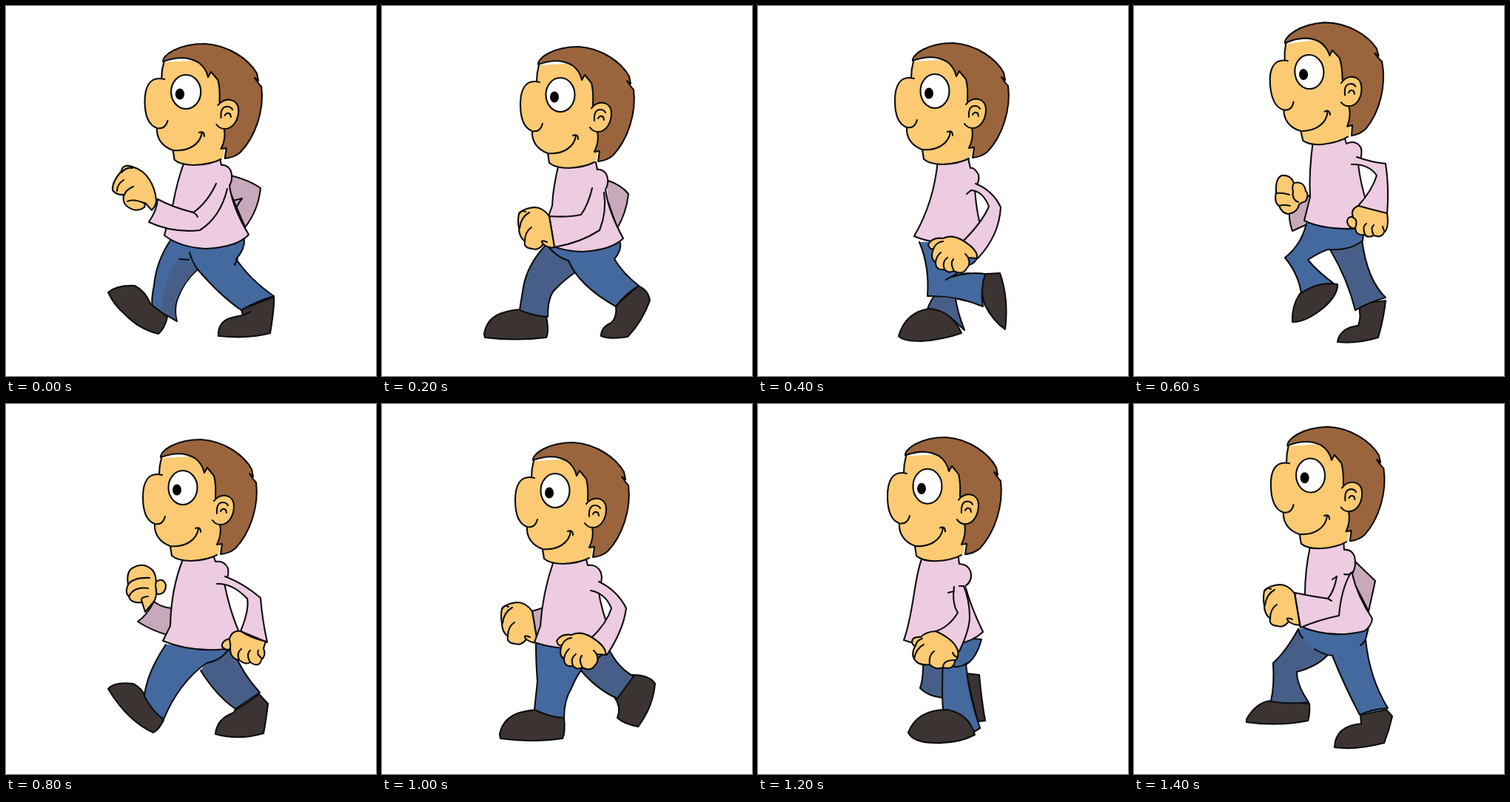
An HTML page that plays this animation: 500x500 px, repeating every 1.6 s.

```html
<!DOCTYPE html>
<html lang="en">
<head>
<meta charset="utf-8">
<title>Walk cycle</title>
<style>
html, body { margin: 0; width: 100%; height: 100%; overflow: hidden; background: #fff; }
svg { display: block; width: 100%; height: 100%; }
path, ellipse { stroke: #0c0c0e; stroke-width: 2.1; stroke-linecap: round; stroke-linejoin: round; }
.skin { fill: #fbca72; }
.hair { fill: #9a653c; }
.pink { fill: #edcbe0; }
.dull { fill: #c8a9bb; }
.blue { fill: #43699f; }
.navy { fill: #475f88; }
.boot { fill: #3b3432; }
.line { fill: none; }
.flat { stroke: none; }
.pose { opacity: 0; animation: show 1.6s step-end infinite; animation-delay: calc(var(--i) * 200ms - 1600ms); }
@keyframes show {
  0% { opacity: 1; }
  12.5%, 100% { opacity: 0; }
}
</style>
</head>
<body>
<svg viewBox="0 0 500 500">
<defs>
  <g id="head">
    <path class="skin flat" d="M210 73Q207 84 207 95C191 94 185 107 185 126C185 146 190 158 201 162C200 176 208 187 222 192L224 205Q232 212 250 212Q272 211 287 203L296 160L286 90L262 70Z"/>
    <path class="line" d="M210 73Q207 84 207 95M211 96C191 91 185 107 185 126C185 146 190 158 201 162Q212 164 215 152M201 162C200 176 208 187 222 192C242 194 258 184 260 168M256 168Q263 165 263 173M222 192L224 205Q232 212 250 212Q272 211 285 204"/>
    <path class="hair" d="M209 72C208 64 228 48 264 48C296 50 322 70 332 88L334 98L329 94Q334 102 338 106C342 138 330 174 310 195Q302 202 290 203L292 189L285 190Q292 176 289 162L283 126Q284 108 281 97L272 86L268 93Q265 80 255 73Q236 62 209 72Z"/>
    <path class="skin" d="M281 131C290 119 308 122 308 138C308 152 300 163 290 163Q283 163 279 157"/>
    <path class="line" d="M285 148Q284 133 293 133Q298 133 300 137M290 145Q292 140 297 143L298 147"/>
    <ellipse cx="239" cy="113" rx="19.5" ry="23" fill="#fff"/>
    <ellipse class="flat" cx="231" cy="116" rx="6" ry="7.5" fill="#000"/>
  </g>
  <g id="low-hand">
    <path class="skin" d="M277 317Q262 308 250 314Q236 312 230 322Q232 330 237 328Q232 342 240 346Q240 358 252 356Q258 362 264 358Q276 364 281 356Q288 350 284 340L296 341Q298 330 277 317Z"/>
    <path class="line" d="M237 328Q241 319 250 318M240 346Q241 338 247 333M252 356Q248 346 256 340M265 358Q259 348 264 342M284 340Q282 337 280 335"/>
  </g>
  <g id="side-hand">
    <path class="skin" d="M217 256Q208 244 197 244Q180 246 176 253Q174 262 176 272Q176 284 184 290Q182 299 194 300Q202 303 209 294Q218 300 224 298Z"/>
    <path class="line" d="M177 272Q179 257 190 251M184 290Q184 277 193 271M209 294Q203 287 214 291M176 253Q179 247 185 250"/>
  </g>
</defs>

<g class="pose" style="--i:0">
  <path class="dull" d="M304 229Q330 236 344 246Q341 276 323 299L298 240"/>
  <path class="line" d="M307 263L319 260Q315 265 312 271"/>
  <path class="boot" d="M138 387Q150 377 174 378Q188 385 195 402L218 420Q215 435 206 443Q180 437 160 416Q146 404 138 387Z"/>
  <path class="boot" d="M318 410L362 393Q363 405 357 442Q330 450 287 446Q286 428 302 422Q312 419 320 418Z"/>
  <path class="line" d="M320 418L331 413"/>
  <path class="blue" d="M222 317Q203 345 200 378Q196 398 198 405Q214 417 231 426Q227 412 231 398Q240 372 259 356Q290 392 318 411Q338 399 362 392Q330 370 311 342Q323 328 322 316"/>
  <path class="navy flat" d="M233 342Q247 342 258 356Q240 372 230 398Q226 412 230 424L209 412Q212 370 233 342"/>
  <path class="line" d="M234 342L247 343M248 333Q252 347 259 356M309 350L313 341"/>
  <path class="pink" d="M241 210Q231 238 226 266L214 310Q235 326 270 328Q312 326 328 309Q306 272 302 243Q308 232 303 221Q298 214 291 215L289 205"/>
  <path class="pink" d="M284 240Q272 266 253 279Q225 272 205 261Q204 276 193 292Q225 307 262 303Q290 285 299 247"/>
  <path class="line" d="M250 278Q257 280 259 285"/>
  <path class="skin" d="M203 262C201 242 190 223 173 218Q158 212 156 223Q143 238 144 249Q150 256 159 255Q157 266 164 271Q176 280 187 272L188 266L197 276Q203 270 203 262Z"/>
  <path class="line" d="M156 225Q163 217 171 219M150 250Q150 241 159 235M159 257Q162 248 172 244M164 264Q173 260 188 267"/>
  <use href="#head" transform="translate(-3 3) scale(1.03 1)"/>
</g>

<g class="pose" style="--i:1">
  <path class="dull" d="M303 235Q324 242 333 254Q330 280 318 300L306 266"/>
  <path class="boot" d="M138 443Q142 420 165 414Q178 410 190 410L222 420Q226 440 222 448Q180 453 139 448Z"/>
  <path class="boot" d="M316 405L346 378Q360 384 362 398Q352 426 332 447Q310 451 296 446Q296 434 310 428Q318 420 316 405Z"/>
  <path class="navy" d="M222 322Q196 350 191 380L186 411Q205 419 224 420Q224 395 232 385Q246 370 264 358L270 325"/>
  <path class="blue" d="M222 322Q236 340 252 344Q266 378 316 406Q328 390 347 378Q326 362 314 342Q324 330 322 320"/>
  <path class="pink" d="M239 213Q231 245 230 270L214 315Q235 331 270 332Q310 330 326 314Q306 278 302 248Q308 238 303 227Q298 220 291 221L289 211"/>
  <path class="pink" d="M284 246Q279 268 269 282Q250 286 226 284L233 326Q268 320 294 303Q304 278 300 252"/>
  <use href="#side-hand" x="9" y="28"/>
  <use href="#head" transform="translate(2 7)"/>
</g>

<g class="pose" style="--i:2">
  <path class="navy" d="M238 392Q229 405 228 415L265 425L279 438Q270 415 267 396"/>
  <path class="boot" d="M190 446Q200 413 232 409Q262 412 275 442Q250 451 220 453Q195 453 190 446Z"/>
  <path class="boot" d="M307 362L327 361Q339 395 334 437Q318 426 307 405Q299 385 307 362Z"/>
  <path class="blue" d="M218 319Q232 352 229 392Q268 391 304 406Q300 384 307 362Q285 359 262 366L285 350Q294 348 297 338L285 318"/>
  <path class="line" d="M254 370Q262 363 285 361"/>
  <path class="pink" d="M243 208Q238 265 211 311Q235 322 275 320L300 295Q294 270 293 245Q300 238 298 228Q292 217 287 219L284 206"/>
  <path class="pink" d="M294 240Q318 250 328 272Q326 310 297 341L277 318Q303 292 312 271Q304 250 288 249L282 254"/>
  <use href="#low-hand"/>
  <use href="#head" transform="translate(0 2)"/>
</g>

<g class="pose" style="--i:3">
  <path class="dull" d="M237 256L210 276Q209 290 214 304L236 294"/>
  <path class="skin" d="M208 281Q200 280 196 270Q189 266 192 252Q191 232 200 229Q212 228 216 239Q230 236 232 250Q237 254 232 264Q222 266 222 272Q218 280 208 281Z"/>
  <path class="line" d="M216 239Q213 244 215 250Q213 262 222 265M192 253Q201 252 210 255M196 270Q203 268 211 270"/>
  <path class="boot" d="M303 403L340 398Q338 420 330 448Q300 457 275 454Q278 435 303 432Q308 420 303 403Z"/>
  <path class="navy" d="M265 329Q289 370 299 411Q318 400 340 394Q315 370 308 316"/>
  <path class="boot" d="M224 389Q245 372 275 376Q276 390 256 408Q231 428 214 427Q213 405 224 389Z"/>
  <path class="blue" d="M233 294Q226 323 204 340Q222 362 226 388Q245 374 270 375Q247 358 235 343Q250 333 262 329Q292 331 309 317L312 295"/>
  <path class="pink" d="M242 182Q236 225 238 258L230 290Q255 302 297 301L315 268Q306 240 303 214Q309 203 307 192Q300 180 287 186L284 176"/>
  <path class="pink" d="M301 204Q320 211 340 213Q345 245 342 282L303 270Q322 249 328 229Q317 213 294 214"/>
  <path class="skin" d="M303 270Q292 275 296 285Q288 284 288 292Q291 302 299 300Q300 311 312 309Q316 314 324 310Q334 314 338 306Q345 300 342 280Q325 276 303 270Z"/>
  <path class="line" d="M296 286Q303 288 299 300M312 308Q308 298 314 294M324 310Q319 300 324 296M338 304L336 298"/>
  <use href="#head" transform="translate(-1 -25.5) rotate(-4 260 130)"/>
</g>

<g class="pose" style="--i:4">
  <path class="dull" d="M200 267Q190 286 178 294Q196 306 221 313L224 276Q210 275 200 267Z"/>
  <path class="skin" d="M199 268L188 281L184 268Q168 270 166 260Q160 255 165 244Q162 226 172 221Q184 214 195 222Q202 226 203 240Q212 234 216 244Q216 256 207 257Q202 258 203 250Q204 262 199 268Z"/>
  <path class="line" d="M165 244Q172 234 194 235M166 260Q173 246 192 249M184 268Q180 261 192 260M203 240Q201 245 203 250"/>
  <path class="boot" d="M309 414Q330 402 342 392L354 405Q351 430 348 445Q315 455 283 446Q285 425 308 417Z"/>
  <path class="navy" d="M263 360Q284 394 310 412L343 390Q320 365 308 335L285 330"/>
  <path class="boot" d="M138 385Q146 375 172 378Q185 385 189 397L213 427Q207 440 199 444Q165 429 138 385Z"/>
  <path class="blue" d="M216 325Q190 364 187 395Q198 416 213 426Q234 376 271 350Q295 345 302 328"/>
  <path class="pink" d="M239 210Q223 250 222 300L212 320Q250 336 298 331L314 306Q302 278 295 242Q302 234 300 222Q295 211 283 213L280 204"/>
  <path class="pink" d="M296 233Q322 243 344 262Q346 290 353 322L317 307Q329 278 326 263Q306 242 285 243"/>
  <path class="skin" d="M317 307Q306 305 302 317Q291 320 292 328Q297 334 303 331Q303 344 315 346Q324 353 330 349Q342 357 345 346Q352 340 348 330L351 321Q330 316 317 307Z"/>
  <path class="line" d="M302 318Q304 325 303 331M315 346Q311 336 318 331M330 349Q324 338 330 333M346 344Q338 338 341 333"/>
  <use href="#head"/>
</g>

<g class="pose" style="--i:5">
  <path class="dull" d="M222 274L203 280L210 322L220 318"/>
  <use href="#side-hand" x="-14" y="24"/>
  <path class="boot" d="M314 396L338 366Q362 366 369 378Q366 410 346 436Q326 432 318 424Q324 410 314 396Z"/>
  <path class="navy" d="M262 352Q288 385 318 398L340 368Q318 356 306 330"/>
  <path class="boot" d="M159 446Q164 422 190 416Q205 412 222 414L246 424Q248 444 244 452Q205 458 160 452Z"/>
  <path class="blue" d="M208 322Q208 350 210 375L206 413Q228 424 246 424Q246 400 256 384Q262 368 276 350Q300 345 306 322"/>
  <path class="pink" d="M232 212Q217 255 214 300L206 322Q240 334 296 330L310 312Q296 280 292 248Q299 240 296 228Q291 216 278 218L275 206"/>
  <path class="pink" d="M293 240Q318 252 330 276Q326 306 304 339L283 316Q304 296 310 276Q302 256 282 252"/>
  <use href="#low-hand" x="6" y="-2"/>
  <use href="#head" transform="translate(-5 4)"/>
</g>

<g class="pose" style="--i:6">
  <path class="boot" d="M281 364L299 366Q302 400 307 428L297 429Z"/>
  <path class="navy" d="M223 345Q224 370 219 384Q230 395 249 397L254 345"/>
  <path class="blue" d="M250 350Q248 385 250 414Q275 420 292 443L300 438Q285 395 281 352Q295 344 302 318L265 315"/>
  <path class="line" d="M265 355Q275 356 282 350"/>
  <path class="boot" d="M203 444Q215 413 255 413Q285 418 293 447Q270 459 240 458Q210 458 203 444Z"/>
  <path class="pink" d="M221 210C211 235 210 285 197 319Q225 330 270 324Q290 321 304 308Q288 275 280 246Q289 240 288 230Q286 217 272 216L270 201"/>
  <path class="pink flat" d="M265 248Q263 270 270 282Q258 302 238 308L272 334Q286 305 286 288L280 246"/>
  <path class="line" d="M257 255L265 253M265 247Q262 270 270 282Q258 302 238 308M272 334Q286 305 286 288Q286 265 278 246L272 246"/>
  <path class="skin" d="M240 307Q226 308 220 315Q208 314 208 322Q210 328 213 326Q206 338 212 346Q218 354 232 352Q240 360 250 356Q264 360 266 348Q272 342 270 333Q265 318 240 307Z"/>
  <path class="line" d="M213 326Q215 319 222 317M211 344Q214 330 224 325M232 352Q230 340 238 334M250 356Q250 346 266 346M263 336Q265 341 269 342"/>
  <use href="#head" transform="translate(-10 -4) scale(1 1.02)"/>
</g>

<g class="pose" style="--i:7">
  <path class="dull" d="M300 214L326 239L317 280L294 235"/>
  <path class="boot" d="M152 426Q165 403 185 401L237 405Q238 420 235 428Q195 436 152 430Z"/>
  <path class="navy" d="M222 304Q205 335 188 350Q190 380 185 402Q210 406 236 403Q220 380 220 362Q247 355 262 339"/>
  <path class="boot" d="M306 420L341 413L349 422Q345 440 338 458Q300 468 271 464Q272 435 307 432Z"/>
  <path class="blue flat" d="M222 304Q227 320 244 331Q256 339 268 340Q284 380 305 420L343 411Q318 370 313 318L320 290Z"/>
  <path class="line" d="M222 304Q223 311 228 316M244 331Q256 339 268 340Q284 380 305 420Q322 412 343 411Q318 370 313 318Q310 324 306 326M313 318L318 298"/>
  <path class="pink" d="M238 193Q231 225 231 258L224 300Q265 318 311 307Q321 300 322 290Q302 260 295 230Q301 218 298 206Q294 196 284 197L283 183"/>
  <path class="pink" d="M274 233Q271 252 262 263Q240 260 217 255L225 302Q252 291 277 286Q280 250 293 228"/>
  <path class="line" d="M268 237L274 233M262 263L267 266M284 230Q292 232 296 226"/>
  <use href="#side-hand"/>
  <use href="#head" transform="translate(0 -17) rotate(-1.5 260 130)"/>
</g>
</svg>
</body>
</html>
```
